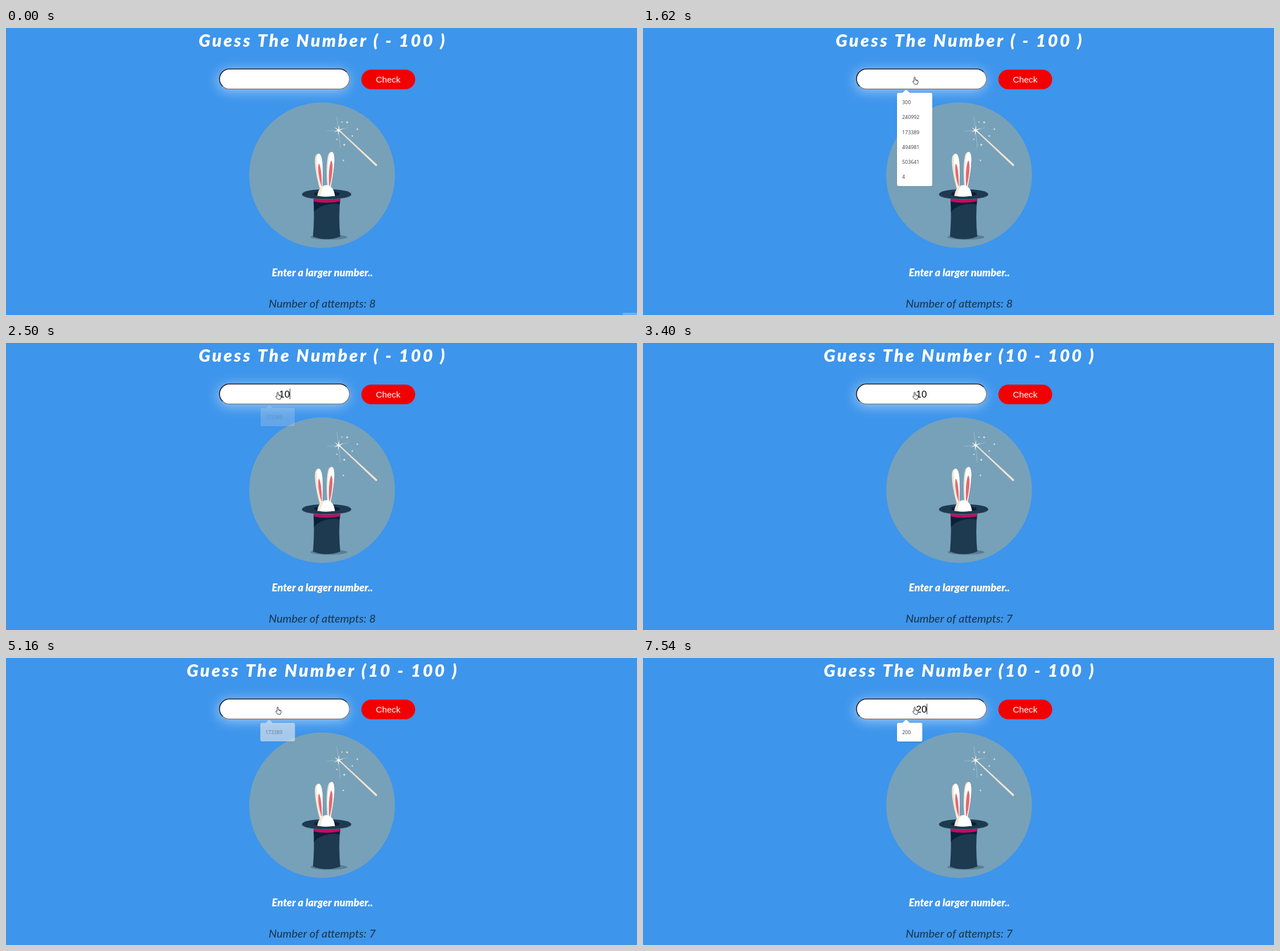
An HTML page with a canvas that plays this animation: 1108x505 px, repeating every 8 s.

```html
<!DOCTYPE html>
<html lang="en">
<head>
<meta charset="utf-8">
<title>Guess The Number</title>
<style>
  html, body { margin: 0; width: 100%; height: 100%; overflow: hidden; background: #3d95ec; }
  canvas { display: block; width: 100vw; height: 100vh; }
</style>
</head>
<body>
<canvas id="stage" width="1108" height="505"></canvas>
<script>
const ctx = document.getElementById('stage').getContext('2d');
const LOOP = 8000;
const C = {
  sky: '#3d95ec', disc: '#77a1b9', hat: '#1d3a50', deep: '#0b2038', band: '#c20c5f',
  cream: '#f6e6d3', pink: '#e06a70', red: '#f20000'
};
const SANS = '"Liberation Sans", Arial, sans-serif';
const FANCY = 'Lato, "Open Sans", sans-serif';
const HISTORY = ['300', '240992', '173389', '494981', '503641', '4'];

// Each entry changes part of the state from its time on.
const timeline = [
  [0, { low: '', left: 8, value: '', caret: false, menu: [], alpha: 1, corner: true }],
  [130, { corner: false }],
  [1000, { menu: HISTORY, alpha: 0.7, caret: true }],
  [1120, { alpha: 1 }],
  [1620, { caret: false }],
  [2130, { value: '1', menu: ['173389'], caret: true }],
  [2380, { value: '10', alpha: 0.85 }],
  [2500, { alpha: 0.22 }],
  [2620, { menu: [] }],
  [2870, { caret: false }],
  [3400, { low: '10', left: 7 }],
  [3500, { caret: true }],
  [4040, { caret: false }],
  [4530, { caret: true }],
  [4910, { value: '1' }],
  [5040, { menu: ['173389'], alpha: 1 }],
  [5160, { value: '', caret: false, alpha: 0.57 }],
  [5280, { menu: [] }],
  [5520, { caret: true }],
  [6160, { caret: false }],
  [6670, { caret: true }],
  [7040, { value: '2' }],
  [7180, { menu: ['240992', '200'], alpha: 1 }],
  [7540, { value: '20', menu: ['200'] }]
];

function stateAt(t) {
  return Object.assign({}, ...timeline.filter(([at]) => at <= t).map(([, change]) => change));
}

function fillPath(d, color) {
  ctx.fillStyle = color;
  ctx.fill(new Path2D(d));
}

function ellipse(x, y, rx, ry, color) {
  ctx.beginPath();
  ctx.ellipse(x, y, rx, ry, 0, 0, Math.PI * 2);
  ctx.fillStyle = color;
  ctx.fill();
}

function pill(x, y, w, h, r, color) {
  ctx.beginPath();
  ctx.roundRect(x, y, w, h, r);
  ctx.fillStyle = color;
  ctx.fill();
}

function line(x1, y1, x2, y2, color, width) {
  ctx.beginPath();
  ctx.moveTo(x1, y1);
  ctx.lineTo(x2, y2);
  ctx.strokeStyle = color;
  ctx.lineWidth = width;
  ctx.stroke();
}

function text(str, x, y, font, color, align = 'center', spacing = 0) {
  ctx.font = font;
  ctx.textAlign = align;
  ctx.letterSpacing = spacing + 'px';
  ctx.fillStyle = color;
  ctx.fillText(str, x, y);
  ctx.letterSpacing = '0px';
}

function star(x, y, r, points, inner, color, turn = 0) {
  ctx.beginPath();
  for (let i = 0; i < points * 2; i++) {
    const a = turn + i * Math.PI / points - Math.PI / 2;
    const d = i % 2 ? r * inner : r;
    ctx.lineTo(x + d * Math.cos(a), y + d * Math.sin(a));
  }
  ctx.fillStyle = color;
  ctx.fill();
}

function drawWand() {
  const faint = 'rgba(240,240,230,.4)';
  line(584, 180, 581, 156, faint, 0.8);
  line(584, 180, 564, 181.5, faint, 0.8);
  line(584, 180, 587, 211, faint, 0.8);
  line(584, 180, 601, 175, faint, 0.8);
  fillPath('M584 180.8L649.6 243.2Q652 242.8 651.6 240.3L585.3 179.2Z', '#f3e7d8');
  line(586, 182.2, 649.5, 243, '#b5aba0', 0.5);
  star(584, 180, 9.5, 6, 0.18, '#fffaf0', 0.12);
  const sparks = [[599, 166, 2.4], [617, 178, 2.2], [608, 190, 2.2], [594, 205.5, 2.6],
    [592.5, 233, 2], [590, 165.5, 1.7], [581, 196, 1.8]];
  for (const [x, y, r] of sparks) star(x, y, r, 4, 0.4, '#f5eee0');
}

function drawRabbit() {
  fillPath('M551 283C545 262 541 238 543 227Q545 221 549 221C556 222 557 243 555.5 283Z', C.cream);
  fillPath('M553 283C550 262 545 240 546 227Q547 221.5 549.5 221.3C556 223 557 243 555.5 283Z', '#fff');
  fillPath('M554 279C549 264 547 246 549 238.5C552.5 240 555 262 554.5 279Z', C.pink);
  fillPath('M564.5 281C562 255 563 233 566 223Q568 218 572 218C579 219 577 245 569.5 282Z', C.cream);
  fillPath('M566.5 281C564 255 565.5 233 568.5 223Q570 218.3 572.5 218.2C579 220 577 245 569.5 282Z', '#fff');
  fillPath('M567.5 279C566 262 567 242 571 233C575.5 237 573 261 568.5 279Z', C.pink);
  fillPath('M546.5 295.5C548 284 554 276.5 562.5 276.5C571 277 576 284 577.5 295.5Q562 297.5 546.5 295.5Z', C.cream);
  fillPath('M552 296C553 286 556.5 278 562.5 276.5C571 277 576 284 577.5 295.5Q562 297.5 552 296Z', '#fff');
}

function drawHat() {
  ellipse(567, 368, 32.5, 4.5, '#5a7f96');
  const body = new Path2D('M540 297H587Q583.5 333 587 367Q563 376 539 367Q542 333 540 297Z');
  ctx.save();
  ctx.clip(body);
  ctx.fillStyle = C.hat;
  ctx.fillRect(535, 295, 56, 82);
  fillPath('M535 295H592V312Q574 307 559 312Q546 316 539 326H535Z', C.deep);
  fillPath('M535 297H592V304Q563 311 535 304Z', C.band);
  ctx.restore();
  ellipse(563, 293.4, 43.3, 8.8, '#4c667a');
  ellipse(563, 292.3, 43.3, 8.8, C.hat);
  ellipse(563.5, 292, 22.5, 4.8, C.deep);
}

function drawInput({ value, caret }) {
  const x = 374.3, y = 71.5, w = 229.4, h = 36.5, r = 18.2;
  ctx.save();
  ctx.shadowColor = 'rgba(255,255,255,.5)';
  ctx.shadowBlur = 22;
  ctx.shadowOffsetX = -2;
  ctx.shadowOffsetY = 3;
  pill(x, y, w, h, r, '#fff');
  ctx.restore();
  const border = new Path2D();
  border.roundRect(x + 0.6, y + 0.6, w - 1.2, h - 1.2, r - 0.6);
  ctx.lineWidth = 1.3;
  ctx.strokeStyle = '#707078';
  ctx.stroke(border);
  // The inset border is dark along the top and left only.
  ctx.save();
  ctx.clip(new Path2D('M373 70H605L585 90H393L373 110Z'));
  ctx.strokeStyle = '#10101c';
  ctx.stroke(border);
  ctx.restore();
  if (value) text(value, 489, 95.7, '17px ' + SANS, '#000');
  if (caret) {
    ctx.fillStyle = '#111';
    ctx.fillRect(488.6 + value.length * 4.8, 80.5, 0.9, 18.5);
  }
}

function drawMenu({ menu, alpha }) {
  if (!menu.length) return;
  const wide = menu.some(item => item.length > 3);
  const w = wide ? 62 : 44.5;
  const h = 33 + (menu.length - 1) * 26.25;
  const scale = 1 - (1 - alpha) * 0.04;
  ctx.save();
  ctx.translate(446 + w / 2, 114 + h / 2);
  ctx.scale(scale, scale);
  ctx.translate(-446 - w / 2, -114 - h / 2);
  ctx.globalAlpha = alpha;
  ctx.shadowColor = 'rgba(0,20,50,.25)';
  ctx.shadowBlur = 2;
  ctx.shadowOffsetY = 0.5;
  ctx.beginPath();
  ctx.roundRect(446, 114, w, h, 3);
  ctx.moveTo(455.5, 114.2);
  ctx.lineTo(462, 108.3);
  ctx.lineTo(468.5, 114.2);
  ctx.fillStyle = '#fff';
  ctx.fill();
  ctx.shadowColor = 'transparent';
  menu.forEach((item, i) =>
    text(item, 455, 134 + i * 26.25, '8.9px "Open Sans", "Noto Sans", sans-serif', '#3c3c44', 'left'));
  ctx.restore();
}

function pointerAt(t) {
  if (t < 130) return null;
  if (t >= 1370) return [473, 86];
  if (t >= 1270) return [472, 82];
  if (t >= 1000) return [477, 77];
  const step = Math.min(6, Math.floor((t - 130) / 123)) / 6;
  const left = (1 - step) ** 2;
  return [477 + 590 * left, 92 + 375 * left];
}

function drawPointer(t) {
  const pos = pointerAt(t);
  if (!pos) return;
  const [x, y] = pos;
  const hand = y < 107 && x < 603;
  const shape = new Path2D(hand
    ? 'M3 8V1.6a1.1 1.1 0 0 1 2.2 0V5.2l3.4.6q1.4.3 1.4 1.6v2.2L8.9 13H4.2L.8 8.9q-.5-1.1.5-1.4z'
    : 'M0 0V12.5L3 9.8L5 14.2L6.9 13.3L5 9.1H9Z');
  ctx.save();
  ctx.translate(x, y);
  ctx.fillStyle = '#fff';
  ctx.fill(shape);
  ctx.strokeStyle = '#222';
  ctx.lineWidth = 0.9;
  ctx.lineJoin = 'round';
  ctx.stroke(shape);
  if (hand) {
    line(6.7, 5.8, 6.7, 7.6, '#222', 0.7);
    line(8.4, 6.1, 8.4, 7.8, '#222', 0.7);
  }
  ctx.restore();
}

function draw(t) {
  const s = stateAt(t);
  ctx.fillStyle = C.sky;
  ctx.fillRect(0, 0, 1108, 505);
  text(`Guess The Number (${s.low} - 100 )`, 556, 32.5, 'italic 900 30.5px ' + FANCY, '#fff', 'center', 3.3);
  ellipse(555, 259, 128, 128, C.disc);
  drawWand();
  drawHat();
  drawRabbit();
  drawInput(s);
  pill(624, 73.3, 94.5, 34.5, 17.2, C.red);
  text('Check', 671, 96, '15.2px ' + SANS, '#fff');
  text('Enter a larger number..', 555.5, 436.7, 'italic 900 18.3px ' + FANCY, '#fff');
  text('Number of attempts: ' + s.left, 555.2, 492, 'italic 500 19.9px ' + FANCY, C.hat);
  if (s.corner) {
    ctx.fillStyle = '#6eaef1';
    ctx.fillRect(1083, 501, 25, 4);
  }
  drawMenu(s);
  drawPointer(t);
}

const start = performance.now();
function tick() {
  draw((performance.now() - start) % LOOP);
  requestAnimationFrame(tick);
}
tick();
</script>
</body>
</html>
```
